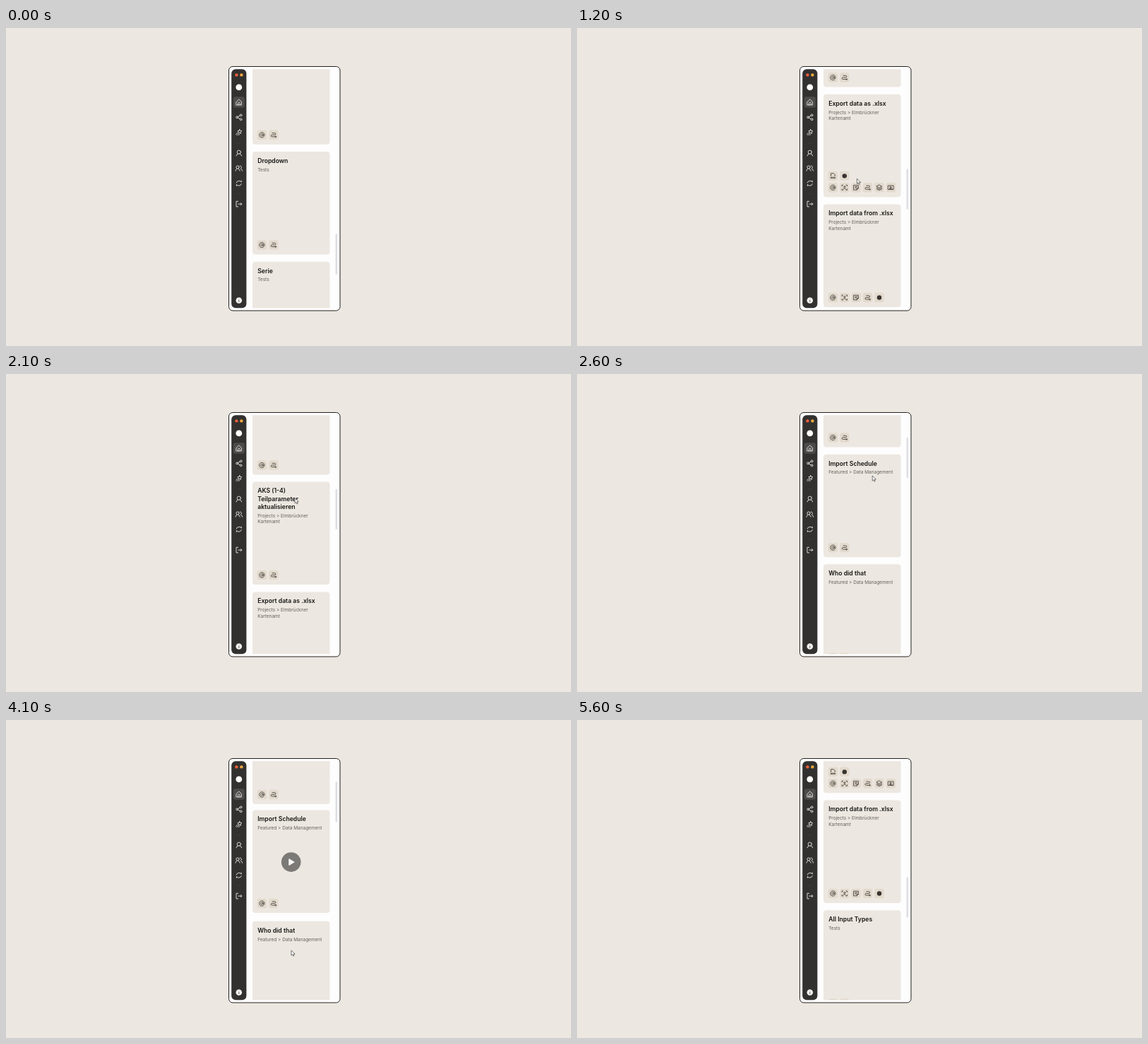
These frames come from a looping animation (800x450 px, 6400 ms). An HTML page:

```html
<!DOCTYPE html>
<html lang="en">
<head>
<meta charset="utf-8">
<title>Script list</title>
<style>
  html, body { margin: 0; width: 100%; height: 100%; overflow: hidden; background: #ece7e0; }
  svg { display: block; width: 100vw; height: 100vh; font-family: Inter, sans-serif; }
  .line { fill: none; stroke: currentColor; stroke-linecap: round; stroke-linejoin: round; }
  .side { color: #f4f2f0; stroke-width: .85; }
  .chip { color: #37332f; stroke-width: .8; }
  .title { font-size: 8.65px; font-weight: 600; fill: #171615; }
  .sub { font-size: 6.49px; fill: #65615d; }
  .home { font-size: 10.8px; font-weight: 600; fill: #171615; }
  .hint { font-size: 6.49px; fill: #aaa7a5; }
  #cursor { fill: #fff; stroke: #333; stroke-width: .65; stroke-linejoin: round; }
</style>
</head>
<body>
<svg viewBox="0 0 800 450">
  <clipPath id="view"><rect x="344" y="58.3" width="126" height="338"/></clipPath>
  <rect x="315.5" y="54.5" width="157.5" height="345.5" rx="5.5" fill="#fefdfd" stroke="#242322"/>
  <rect x="319.2" y="58.3" width="21.2" height="338" rx="6" fill="#323130"/>
  <circle cx="326.4" cy="66.4" r="2.2" fill="#ee5f3b"/>
  <circle cx="333.4" cy="66.4" r="2.2" fill="#f3a83c"/>
  <circle cx="329.8" cy="83.9" r="4.4" fill="#fff"/>
  <rect x="321.8" y="97.2" width="16" height="15.6" rx="3" fill="#4d4b4a"/>
  <path d="M327 162.8h5.5M327 234.2h5.5" stroke="#454342" stroke-width=".6"/>
  <g id="menu"></g>
  <circle cx="329.8" cy="385.5" r="4.3" fill="#f4f2f0"/>
  <path d="M329.8 385.1v2.4M329.8 383.2v.4" stroke="#323130" stroke-width=".9"/>
  <g clip-path="url(#view)">
    <g id="list">
      <text class="home" x="349" y="76">Home</text>
      <text class="sub" x="349" y="88.9">Discover and access your own</text>
      <text class="sub" x="349" y="97.9">published scripts.</text>
      <rect x="349" y="110" width="110.5" height="20.2" rx="5" fill="#fff" stroke="#e0dddb" stroke-width=".8"/>
      <g id="search"></g>
      <text class="hint" x="365" y="122.5">Search</text>
    </g>
  </g>
  <rect id="thumb" x="466.6" y="58.3" width="2.3" height="57.5" rx="1.1" fill="#dddcde"/>
  <g id="cursor">
    <path id="arrow" d="M0 0V7.2L1.7 5.7 2.8 8.2 4 7.7 2.9 5.2H5.2Z"/>
    <path id="hand" d="M-.8 .6Q0 -1 .8 .6V3.2L4 4Q4.8 4.2 4.8 5V7Q4.8 9.8 2 9.8H1Q-.6 9.8 -1.5 8.2L-3 5.8Q-3 4.7 -.8 6.2Z"/>
  </g>
</svg>
<script>
const LOOP = 6400, STEP = 100, FADE = 300;
const TOP = 143.5, PITCH = 155.7, THUMB = .1701;
const $ = id => document.getElementById(id);

// Icon outlines, centred on 0,0
const ring = (x, y, r) => `M${x + r} ${y}a${r} ${r} 0 1 1 ${-2 * r} 0a${r} ${r} 0 1 1 ${2 * r} 0`;
const box = (w, h) => `M${-w} ${-h}H${w}V${h}H${-w}Z`;
const both = f => f(1) + f(-1);
const person = (x, r) => ring(x, -1.4, r) + both(s => `M${x + 1.5 * r * s} 3.8Q${x + 1.2 * r * s} 1.3 ${x + .5 * r * s} .9`);
const starAt = (x, y, r) => 'M' + Array.from({ length: 10 }, (_, i) => {
  const a = i * Math.PI / 5, d = i % 2 ? r / 2 : r;
  return [x + d * Math.sin(a), y - d * Math.cos(a)].map(v => v.toFixed(2));
}).join('L') + 'Z';

const icons = {
  home: 'M-3.6 -.6L0 -4 3.6 -.6V3.9H-3.6ZM-1.3 3.9V1.4a1.3 1.3 0 0 1 2.6 0V3.9',
  share: ring(-2.7, 0, 1.4) + both(s => ring(2.8, 3 * s, 1.4) + `M-1.5 ${.7 * s}L1.6 ${2.3 * s}`),
  star: starAt(1, -1, 3.1) + 'M-2 .6l-2.2 2.2M-1 2.2l-2 2M1 2.6l-1.4 1.4',
  user: person(0, 2.6),
  users: person(-1.8, 2.1) + 'M1.4 -3.4a2.1 2.1 0 0 1 1 4Q4.4 1.3 4.9 3.8',
  sync: both(s => `M${-3.6 * s} ${-.8 * s}Q${-2.8 * s} ${-3.4 * s} 0 ${-3.4 * s}T${3.4 * s} ${-1.6 * s}v${-2 * s}`),
  exit: 'M-1.2 -3.8H-3.8V3.8H-1.2M-1 0H4M2.4 -1.6L4 0 2.4 1.6',
  at: ring(0, 0, 1.6) + 'M1.6 -1.5V.6a1 1 0 0 0 2.1 0V0a3.7 3.7 0 1 0 -1.6 3.1',
  route: 'M-1.8 -2.7H1.7a1.3 1.3 0 0 1 0 2.6H-2.3a1.3 1.3 0 0 0 0 2.6H2' + ring(2.9, 2.5, .9),
  scan: both(s => both(u => `M${3.7 * s} ${2 * u}V${3.5 * u}H${2.2 * s}`)) + ring(0, -.9, 1.1) + 'M-1.9 2.2Q0 -.2 1.9 2.2',
  note: 'M-3.2 -3.3H3.2V1L1 3.3H-3.2ZM3.2 1H1V3.3M-1.6 -1.3H1.6M-1.6 .4H.4',
  layers: 'M0 -3.6L3.7 -1.6 0 .4 -3.7 -1.6Z' + [.3, 2].map(y => `M-3.7 ${y}l3.7 1.9 3.7 -1.9`).join(''),
  video: box(3.7, 2.8) + 'M-.8 -1.4L1.4 -.2 -.8 1ZM-2 1.9H2',
  file: 'M-2.8 .2V-3.6H1L2.8 -1.8V.2' + [-2.4, 0, 2.4].map(x => ring(x, 2.5, .8)).join(''),
  lens: ring(-.4, -.4, 2.8) + 'M1.7 1.7L3.3 3.3'
};

const basic = ['at', 'route'];
const data = 'Featured > Data Management';
const office = 'Projects > Elmbrückner|Kartenamt';
const cards = [
  ['Export Schedule', data, basic],
  ['Import Schedule', data, basic],
  ['Who did that', data, basic],
  ['Update room data', office, basic],
  ['AKS (1-4)|Teilparameter|aktualisieren', office, basic],
  ['Export data as .xlsx', office, ['at', 'scan', 'note', 'route', 'layers', 'video'], ['file', 'dot']],
  ['Import data from .xlsx', office, ['at', 'scan', 'note', 'route', 'dot']],
  ['All Input Types', 'Tests', basic],
  ['Dimension By Faces', 'Tests', basic],
  ['Dropdown', 'Tests', basic],
  ['Serie', 'Tests', basic]
];

const icon = (name, x, y, cls) =>
  `<path class="line ${cls}" transform="translate(${x} ${y})" d="${icons[name]}"/>`;

const lines = (text, cls, y, gap) => text.split('|').map((s, i) =>
  `<text class="${cls}" x="356.2" y="${y + i * gap}">${s.replace('>', '&gt;')}</text>`).join('');

const chips = (names, y) => names.map((name, i) => {
  const x = 362.4 + i * 16.4;
  const mark = name === 'dot' ? `<circle cx="${x}" cy="${y}" r="3.2" fill="#37332f"/>` : icon(name, x, y, 'chip');
  return `<rect x="${x - 6.7}" y="${y - 6.7}" width="13.4" height="13.4" rx="3" fill="#e2dacd"/>${mark}`;
}).join('');

function card([title, sub, row, upper = []]) {
  const extra = (title.split('|').length - 1) * 11.25;
  return `<g class="card">
    <rect x="349" width="109.5" height="145.5" rx="4" fill="#ece7e0"/>
    ${lines(title, 'title', 16, 11.25)}${lines(sub, 'sub', 27.8 + extra, 8.6)}
    ${chips(upper, 115.6)}${chips(row, 132)}
    <g class="play"><circle cx="403.7" cy="73.6" r="13.8" fill="#525150"/>
    <path d="M400.8 69.2V78L408.2 73.6Z" fill="#fff" stroke="#fff" stroke-linejoin="round"/></g></g>`;
}

const menu = [['home', 'share', 'star'], ['user', 'users', 'sync'], ['exit']];
$('menu').innerHTML = menu.map((group, g) => group.map((name, i) =>
  icon(name, 329.8, 105 + (g * 3 + i) * 21.35 + g * 8, 'side')).join('')).join('');
$('search').innerHTML = icon('lens', 358.8, 120.2, 'chip');
$('list').insertAdjacentHTML('beforeend', cards.map(card).join(''));

// Each move: start, end, then the values it arrives at
const swipes = [[0, 0, 1369.8], [705, 1500, 664.8], [2050, 3010, 0], [3990, 4600, 659.3], [4600, 4750, 964.2]];
const moves = [[0, 0, 162, 300], [200, 500, 384, 247], [800, 1500, 404.6, 191.2], [1850, 2500, 418.2, 144],
  [3300, 3600, 360.2, 136.7], [3600, 3900, 404, 330], [4050, 4600, 404, 157], [5000, 5400, 1, 329]];
// Card, hover start, hover end
const hovers = [[9, 350, 800], [4, 1525, 1850], [0, 2900, 3300], [1, 3700, 4050], [6, 4950, 5300]];

const clamp = v => Math.min(1, Math.max(0, v));
const coast = f => 1 - (1 - f) ** 1.5;
const smooth = f => f * f * (3 - 2 * f);
const place = (el, x, y) => el.setAttribute('transform', `translate(${x} ${y})`);
const show = (el, on) => { el.style.display = on ? '' : 'none'; };

function glide([first, ...rest], t, ease) {
  return rest.reduce((from, [start, end, ...to]) => {
    const f = ease(clamp((t - start) / (end - start)));
    return from.map((v, i) => v + (to[i] - v) * f);
  }, first.slice(2));
}

const els = [...document.querySelectorAll('.card')];

function draw(t) {
  const [top] = glide(swipes, t, coast), [x, y] = glide(moves, t, smooth);
  place($('list'), 0, -top);
  place($('thumb'), 0, top * THUMB);
  els.forEach((el, i) => {
    const [, on, off] = hovers.find(h => h[0] === i) || [i, LOOP, LOOP];
    const k = clamp((t - on) / FADE) - clamp((t - off) / FADE);
    place(el, 0, TOP + i * PITCH - 2 * k);
    el.querySelector('.play').setAttribute('opacity', clamp((k - .4) / .6));
  });
  const over = hovers.some(([, on, off]) => t >= on && t < off);
  show($('hand'), over);
  show($('arrow'), !over);
  show($('cursor'), t >= 200 && t < 5500);
  place($('cursor'), x, y);
}

const start = performance.now();
function tick() {
  const t = (performance.now() - start) % LOOP;
  draw(Math.floor(t / STEP) * STEP);
  requestAnimationFrame(tick);
}
tick();
</script>
</body>
</html>
```
